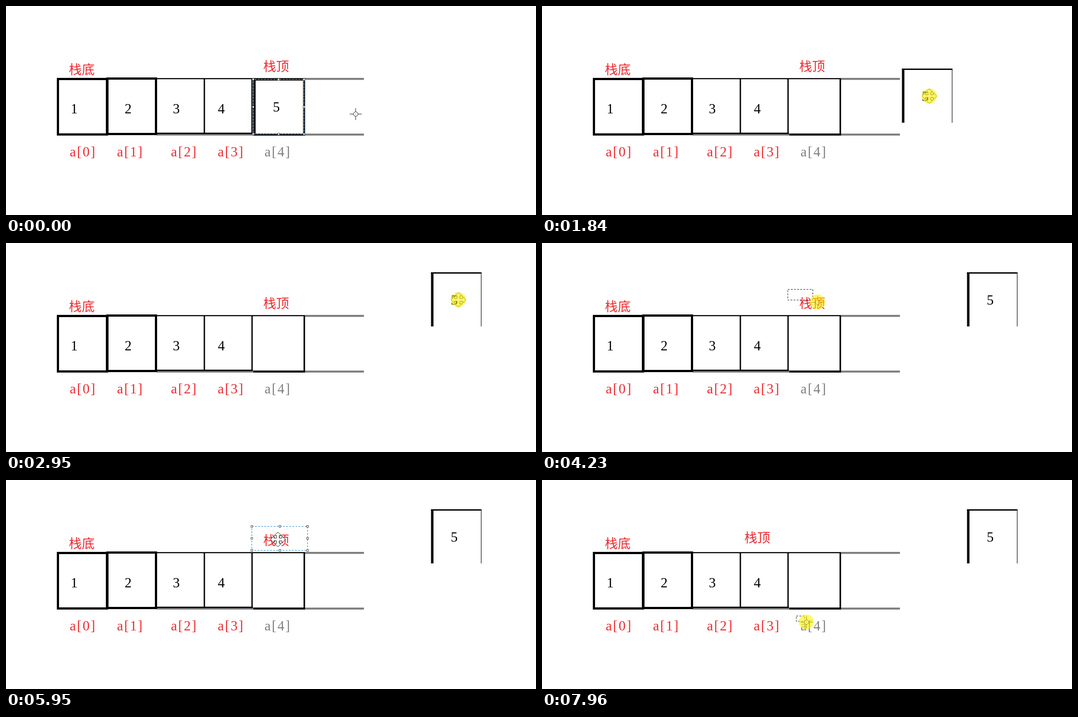
An HTML page with a canvas that plays this animation: 1189 by 471 pixels, repeating every 8000 ms.

```html
<!DOCTYPE html>
<html lang="zh">
<head>
<meta charset="utf-8">
<title>Stack pop</title>
<style>
  html, body { margin: 0; width: 100%; height: 100%; overflow: hidden; background: #fff; }
  canvas { display: block; }
</style>
</head>
<body>
<canvas id="stage" width="1189" height="471"></canvas>
<script>
const ctx = document.getElementById('stage').getContext('2d');
const LOOP = 8000, STEP = 70;
const RED = '#ee2a30', GRAY = '#7f7f7f';
const SERIF = '31px "Liberation Serif", serif';
const HAN = '300 29px "Noto Sans CJK SC Light", "Noto Sans CJK SC", "Noto Sans CJK", sans-serif';

// Each gesture carries the pointer to a point, bending towards `via`; its act lasts until the next one.
const GESTURES = [
  { act: 'pickItem', from: 0, to: 1, end: [784, 243] },
  { act: 'pickItem', from: 330, to: 750, end: [616, 224] },
  { act: 'dragItem', from: 1010, to: 1080, end: [616, 227] },
  { act: 'dragItem', from: 1080, to: 2540, end: [1002, 139], via: [913, 226] },
  { act: 'dragItem', from: 2600, to: 2950, end: [1015, 128] },
  { act: 'pickItem', from: 3280, to: 3970, end: [551, 104], via: [790, 248] },
  { act: 'band', from: 4100, to: 4510, end: [676, 158], via: [676, 158] },
  { act: 'pickLabel', from: 5390, to: 5950, end: [610, 134] },
  { act: 'dragLabel', from: 6090, to: 6650, end: [487, 128] },
  { act: 'pickLabel', from: 7050, to: 7820, end: [570, 306], via: [660, 380] },
  { act: 'band', from: 7890, to: 7960, end: [593, 320] },
];

const clamp = (v, lo, hi) => Math.min(hi, Math.max(lo, v));
const inside = (x, y, [bx, by, w, h]) => x >= bx && x < bx + w && y >= by && y < by + h;

function pointer(t) {
  let p = GESTURES[0].end;
  for (const { from, to, end, via } of GESTURES.slice(1)) {
    if (t < from) break;
    const q = to - Math.ceil(Math.max(0, to - t) / STEP) * STEP;
    const k = clamp((q - from) / (to - from), 0, 1);
    p = p.map((a, i) => {
      const bend = via ? via[i] : (a + end[i]) / 2;
      return Math.round((1 - k) ** 2 * a + 2 * k * (1 - k) * bend + k * k * end[i]);
    });
  }
  return p;
}

// Where the pointer was last while performing the given drag
function dragged(act, t) {
  const first = GESTURES.findIndex(g => g.act === act);
  const next = GESTURES.findIndex((g, i) => i > first && g.act !== act);
  return pointer(clamp(t, GESTURES[first].from, GESTURES[next].from));
}

function bar(x0, y0, x1, y1, color = '#000') {
  ctx.fillStyle = color;
  ctx.fillRect(x0, y0, x1 - x0, y1 - y0);
}

function frame(x, y, w, h, t) {
  ctx.strokeStyle = '#000';
  ctx.lineWidth = t;
  ctx.strokeRect(x + t / 2, y + t / 2, w - t, h - t);
}

function text(str, x, y, color, font = SERIF, spacing = 0) {
  ctx.font = font;
  ctx.letterSpacing = spacing + 'px';
  ctx.fillStyle = color;
  ctx.fillText(str, x, y);
}

function digit(n, x, y) {
  ctx.textAlign = 'center';
  text(n, x, y, '#000');
  ctx.textAlign = 'left';
}

function drawArray() {
  bar(670, 162, 803, 166.5, GRAY);
  bar(338, 287.5, 803, 292, GRAY);
  frame(114, 162, 115, 130, 5);
  frame(225, 161, 114, 130, 5);
  bar(338, 162.5, 670, 165);
  bar(338, 285.5, 554, 288.5);
  bar(443.5, 163, 446.5, 288);
  bar(550.5, 163, 553.5, 288);
  bar(667.5, 163, 671, 292);
  bar(555, 287.5, 671, 292);
  [153, 274, 382, 483].forEach((x, i) => digit(i + 1, x, 242));
  [143, 249, 370, 475, 580].forEach((x, i) => text(`a[${i}]`, x, 339, i < 4 ? RED : GRAY, SERIF, 2.4));
  text('栈底', 141, 154, RED, HAN);
}

function drawItem(x, y) {
  bar(x + .5, y, x + 6, y + 122);
  bar(x + .5, y, x + 113.5, y + 3);
  bar(x + 112.5, y, x + 113.7, y + 122);
  digit(5, x + 52.5, y + 73);
}

function dashed(x, y, w, h, color) {
  ctx.lineWidth = 1;
  ctx.strokeStyle = '#fff';
  ctx.strokeRect(x + .5, y + .5, w, h);
  ctx.strokeStyle = color;
  ctx.setLineDash([4, 3]);
  ctx.strokeRect(x + .5, y + .5, w, h);
  ctx.setLineDash([]);
}

function selection(x, y, w, h) {
  dashed(x, y, w, h, '#0078d7');
  for (let i = 0; i < 9; i++) {
    if (i === 4) continue;
    const hx = Math.round(x + (i % 3) * w / 2) - 2;
    const hy = Math.round(y + Math.floor(i / 3) * h / 2) - 2;
    bar(hx, hy, hx + 5, hy + 5, '#fff');
    ctx.strokeStyle = '#444';
    ctx.strokeRect(hx + .5, hy + .5, 4, 4);
  }
}

function moveCursor() {
  ctx.beginPath();
  for (let i = 0; i < 4; i++) {
    for (const [x, y] of [[-3, -3], [-3, -9], [-8, -9], [0, -16.5], [8, -9], [3, -9]]) ctx.lineTo(x, y);
    ctx.rotate(Math.PI / 2);
  }
  ctx.closePath();
  ctx.fillStyle = '#fff';
  ctx.fill();
  ctx.stroke();
}

function crossCursor() {
  ctx.beginPath();
  ctx.arc(.5, .5, 5, 0, 7);
  for (const [a, b] of [[-13, -5], [6, 14]]) {
    ctx.moveTo(a, .5); ctx.lineTo(b, .5);
    ctx.moveTo(.5, a); ctx.lineTo(.5, b);
  }
  ctx.stroke();
  bar(0, 0, 1, 1);
}

function drawCursor(x, y, moving, pressed) {
  ctx.save();
  ctx.translate(x, y);
  ctx.strokeStyle = '#111';
  ctx.lineWidth = 1;
  moving ? moveCursor() : crossCursor();
  if (pressed) {
    ctx.fillStyle = 'rgba(255, 242, 0, .58)';
    ctx.beginPath();
    ctx.arc(0, 0, 17, 0, 7);
    ctx.fill();
  }
  ctx.restore();
}

function draw(t) {
  const { act, from, to } = GESTURES.filter(g => g.from <= t).pop();
  const [px, py] = pointer(t);
  bar(0, 0, 1189, 471, '#fff');
  drawArray();

  const [ix, iy] = dragged('dragItem', t);
  const item = [ix - 62, iy - 62, 114, 123];
  if (t < 1010) item[1] = 165;
  drawItem(item[0], item[1]);

  const [lx, ly] = dragged('dragLabel', t);
  const label = [lx - 59, ly - 30, 125, 54];
  text('栈顶', label[0] + 26, label[1] + 43, RED, HAN);

  const box = { pickItem: item, pickLabel: label }[act];
  if (box) selection(...box);

  if (act === 'band' && t > from) {
    const [ax, ay] = pointer(from);
    const reach = t < to + STEP ? .83 : 1; // trails the pointer until it settles
    dashed(ax, ay, Math.round((px - ax) * reach), Math.round((py - ay) * reach), '#000');
  }

  const moving = act.startsWith('drag') || (box && inside(px, py, box));
  drawCursor(px, py, moving, !box);
}

const start = performance.now();
function tick() {
  draw((performance.now() - start) % LOOP);
  requestAnimationFrame(tick);
}
tick();
</script>
</body>
</html>
```
